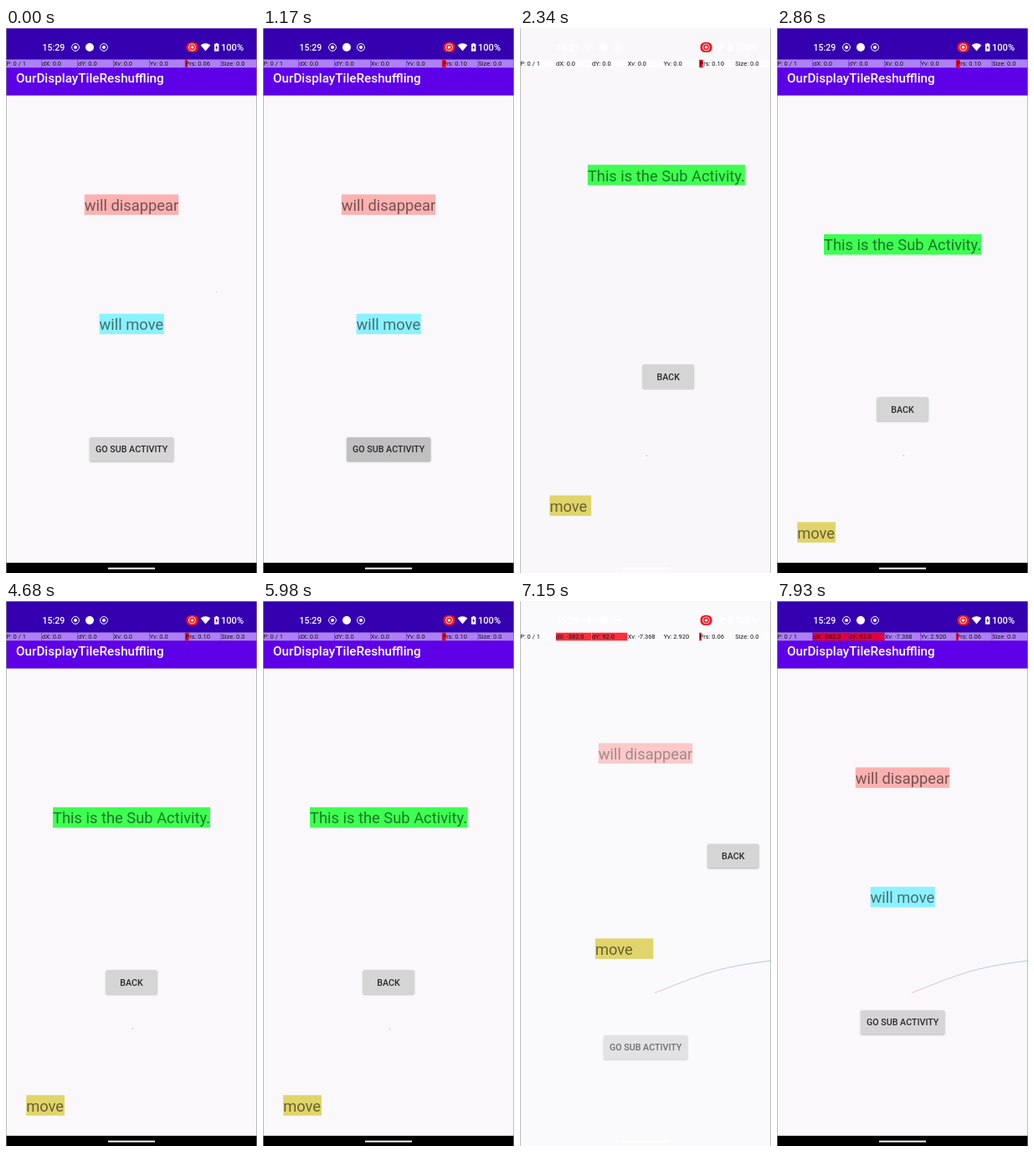
An HTML page with a canvas that plays this animation: 300 by 650 pixels, repeating every 8 s.

```html
<!DOCTYPE html>
<html lang="en">
<head>
<meta charset="utf-8">
<title>Screen transition</title>
<style>
  html, body { margin: 0; width: 100%; height: 100%; overflow: hidden; background: #faf8fb; }
  canvas { display: block; width: 300px; height: 650px; }
</style>
</head>
<body>
<canvas></canvas>
<script>
const W = 300, H = 650, LOOP = 8000, STEP = 130;
const BAR_TOP = 37.8, BAR_BOTTOM = 80.5, NAV_TOP = 637.8, BACKGROUND = '#faf8fb';
const TAP = 1040, SWIPE_START = 6040, SWIPE_END = 6380;
const SHARED_OUT = 1573, SHARED_BACK = 6482, DURATION = 1000;
const DELAY_PER_PX = 0.53;   // circular propagation of the explode

const canvas = document.querySelector('canvas');
const ctx = canvas.getContext('2d');
const dpr = window.devicePixelRatio || 1;
canvas.width = W * dpr;
canvas.height = H * dpr;

const clamp = v => Math.max(0, Math.min(1, v));
const lerp = (a, b, p) => a + (b - a) * p;
const easeInOut = u => (1 - Math.cos(Math.PI * clamp(u))) / 2;

function rect(x, y, w, h, color) {
  ctx.fillStyle = color;
  ctx.fillRect(x, y, w, h);
}

function text(str, x, y, size, color, weight = 400, align = 'left') {
  ctx.font = `${weight} ${size}px Roboto, sans-serif`;
  ctx.textAlign = align;
  ctx.fillStyle = color;
  ctx.fillText(str, x, y);
}

function circle(x, y, r, color, lineWidth) {
  ctx.beginPath();
  ctx.arc(x, y, r, 0, Math.PI * 2);
  if (lineWidth) {
    ctx.strokeStyle = color;
    ctx.lineWidth = lineWidth;
    ctx.stroke();
  } else {
    ctx.fillStyle = color;
    ctx.fill();
  }
}

function label(str, x, y, w, color) {
  rect(x, y, w, 24.4, color);
  text(str, x, y + 19.4, 18.33, 'rgba(0,0,0,.54)');
}

function button(str, x, y, w, color = '#d6d5d6') {
  ctx.save();
  ctx.shadowColor = 'rgba(0,0,0,.3)';
  ctx.shadowBlur = 2 * dpr;
  ctx.shadowOffsetY = 0.7 * dpr;
  ctx.fillStyle = color;
  ctx.beginPath();
  ctx.roundRect(x, y, w, 28.6, 1.5);
  ctx.fill();
  ctx.restore();
  text(str, x + w / 2, y + 18.2, 10.69, '#2a2a2c', 500, 'center');
}

// Views are placed by their centre, which sets the direction and delay of the explode.
const chrome = [
  { cy: 19, free: true, draw: () => rect(0, 0, W, BAR_TOP, '#3500b0') },
  { cy: 59, draw: () => {
    rect(0, BAR_TOP, W, BAR_BOTTOM - BAR_TOP, '#5d00e8');
    text('OurDisplayTileReshuffling', 12, 65, 15.28, '#fff', 500);
  } },
  { cy: 644, free: true, draw: () => rect(0, NAV_TOP, W, H - NAV_TOP, '#000') },
];

const mainWindow = {
  centre: [150, 353], reach: 383, near: 142, far: 334,
  views: [
    { cy: 211, draw: () => label('will disappear', 93.8, 198.5, 112.4, '#fcb1b1') },
    { cy: 502, draw: t => button('GO SUB ACTIVITY', 100, 488.2, 100.3,
        t >= TAP && t < 2600 ? '#c0c0c1' : undefined) },
    ...chrome,
  ],
  amount: (t, d) => t < 4000 ? leaving(mainWindow, t - 1300, d) : arriving(mainWindow, t - 6425, d),
};

const subWindow = {
  centre: [47, 602], reach: 653, near: 111, far: 592,
  views: [
    { cy: 259, draw: () => label('This is the Sub Activity.', 56, 246, 188, '#3eff52') },
    { cy: 454, draw: () => button('BACK', 119.5, 440.3, 61.2) },
    ...chrome,
  ],
  amount: (t, d) => t < 4000 ? arriving(subWindow, t - SHARED_OUT, d) : leaving(subWindow, t - 6402, d),
};

// The farthest views leave first, the nearest arrive first.
function leaving(win, elapsed, d) {
  return clamp((elapsed - DELAY_PER_PX * (win.far - d)) / DURATION) ** 2;
}

function arriving(win, elapsed, d) {
  return (1 - clamp((elapsed - DELAY_PER_PX * (d - win.near)) / DURATION)) ** 2;
}

function drawViews(win, t) {
  for (const view of win.views) {
    const dx = 150 - win.centre[0], dy = view.cy - win.centre[1];
    const distance = Math.hypot(dx, dy);
    const shift = win.amount(t, distance) * win.reach / distance;
    ctx.save();
    if (!view.free) {
      ctx.beginPath();
      ctx.rect(0, BAR_TOP, W, H - BAR_TOP);
      ctx.clip();
    }
    ctx.translate(dx * shift, dy * shift);
    view.draw(t);
    ctx.restore();
  }
}

function drawWindows(t) {
  const sharing = t >= SHARED_OUT && t < SHARED_BACK + DURATION;
  const shown = t < 4000
    ? clamp((t - SHARED_OUT) / DURATION)
    : clamp(1 - (t - SHARED_BACK) / DURATION);
  rect(0, 0, W, H, BACKGROUND);
  if (shown < 1) drawViews(mainWindow, t);
  ctx.globalAlpha = shown;
  rect(0, 0, W, H, BACKGROUND);
  ctx.globalAlpha = 1;
  if (t >= SHARED_OUT && t < 7650) drawViews(subWindow, t);

  if (sharing) {
    const p = t < 4000
      ? easeInOut((t - SHARED_OUT) / DURATION)
      : 1 - easeInOut((t - SHARED_BACK) / DURATION);
    label('move', lerp(111.6, 24.2, p), lerp(340.8, 589.3, p), lerp(77.2, 45.8, p), '#e0d46a');
  } else {
    label('will move', 111.6, 340.8, 77.2, '#8cf1ff');
  }
}

function drawEdges() {
  const sides = 'rgba(150,150,152,.6)';
  rect(0, 0, 1, H, sides);
  rect(W - 1, 0, 1, H, sides);
  rect(0, 0, W, 0.4, BACKGROUND);
}

function drawStatusIcons() {
  text('15:29', 43.5, 27, 10.5, '#fff', 500);
  for (const x of [83, 117]) {
    circle(x, 23, 4.4, '#fff', 1);
    circle(x, 23, 2, '#fff');
  }
  circle(100, 23, 5, '#fff');

  ctx.fillStyle = '#f0141e';
  ctx.beginPath();
  ctx.roundRect(215.5, 17, 14, 12, 5.5);
  ctx.fill();
  circle(222.5, 23, 4, '#fff', 0.9);
  circle(222.5, 23, 1.8, '#fff');

  ctx.beginPath();
  ctx.moveTo(238.5, 27.6);
  ctx.lineTo(232.6, 20.6);
  ctx.quadraticCurveTo(238.5, 16, 244.4, 20.6);
  ctx.fill();

  // Battery with the charging bolt cut out.
  ctx.fill(new Path2D('M249 19h1.6v-1h2.2v1h1.6v8.8h-5.4z M252 20.5l-1.8 3.3h1.3l-.2 2.6 1.9-3.5h-1.3z'), 'evenodd');
  text('100%', 257, 27, 11.1, '#fff', 500);
  rect(122, 643.6, 56, 1.9, '#fff');
}

function drawPointerBar(t) {
  const swiped = t >= SWIPE_END;
  const touching = t >= SWIPE_START && !swiped;
  const pressure = t >= TAP && t < SWIPE_START ? 0.10 : 0.06;
  const cells = [
    touching ? 'P: 1 / 1' : 'P: 0 / 1',
    swiped ? 'dX: -382.0' : 'dX: 0.0',
    swiped ? 'dY: 92.0' : 'dY: 0.0',
    swiped ? 'Xv: -7.368' : 'Xv: 0.0',
    swiped ? 'Yv: 2.920' : 'Yv: 0.0',
    'Prs: ' + pressure.toFixed(2),
    'Size: 0.0',
  ];
  const width = W / cells.length;
  cells.forEach((str, i) => {
    const x = i * width;
    const moved = swiped && (i === 1 || i === 2);
    rect(x, BAR_TOP, width - 0.4, 9.5, moved ? 'rgba(255,0,20,.82)' : 'rgba(255,255,255,.5)');
    if (i === 5) rect(x, BAR_TOP, width * pressure, 9.5, '#f00010');
    text(str, x + 0.2, 45.2, 7.5, '#111');
  });
}

function drawTouches(t) {
  if (t < TAP) return rect(251, 314.5, 1, 1, '#b9c4c8');
  if (t < SWIPE_START) return rect(151, 509.5, 1, 1, '#8a8a90');

  const progress = clamp((t - SWIPE_START) / (SWIPE_END - SWIPE_START));
  const stroke = ctx.createLinearGradient(161, 0, W, 0);
  stroke.addColorStop(0, '#d9a5a8');
  stroke.addColorStop(0.4, '#a3b3b6');
  stroke.addColorStop(1, '#7fb5b8');
  ctx.save();
  ctx.strokeStyle = stroke;
  ctx.lineWidth = 0.65;
  ctx.setLineDash([146 * progress, 400]);
  ctx.beginPath();
  ctx.moveTo(300, 429);
  ctx.bezierCurveTo(268, 433, 245, 437, 222, 444.5);
  ctx.bezierCurveTo(199, 452, 180, 460, 161, 467.5);
  ctx.stroke();
  ctx.restore();

  const arrow = progress * clamp((6780 - t) / 200);
  if (arrow > 0) {
    ctx.save();
    ctx.globalAlpha = arrow;
    ctx.strokeStyle = '#fff';
    ctx.lineWidth = 2;
    ctx.beginPath();
    ctx.moveTo(269.5, 390);
    ctx.lineTo(261, 399);
    ctx.lineTo(269.5, 408);
    ctx.stroke();
    ctx.restore();
  }
}

function draw(t) {
  ctx.setTransform(dpr, 0, 0, dpr, 0, 0);
  drawWindows(t);
  drawStatusIcons();
  drawPointerBar(t);
  drawTouches(t);
  drawEdges();
}

const start = performance.now();
function frame() {
  const t = (performance.now() - start) % LOOP;
  draw(Math.floor(t / STEP) * STEP);
  requestAnimationFrame(frame);
}
frame();
</script>
</body>
</html>
```
